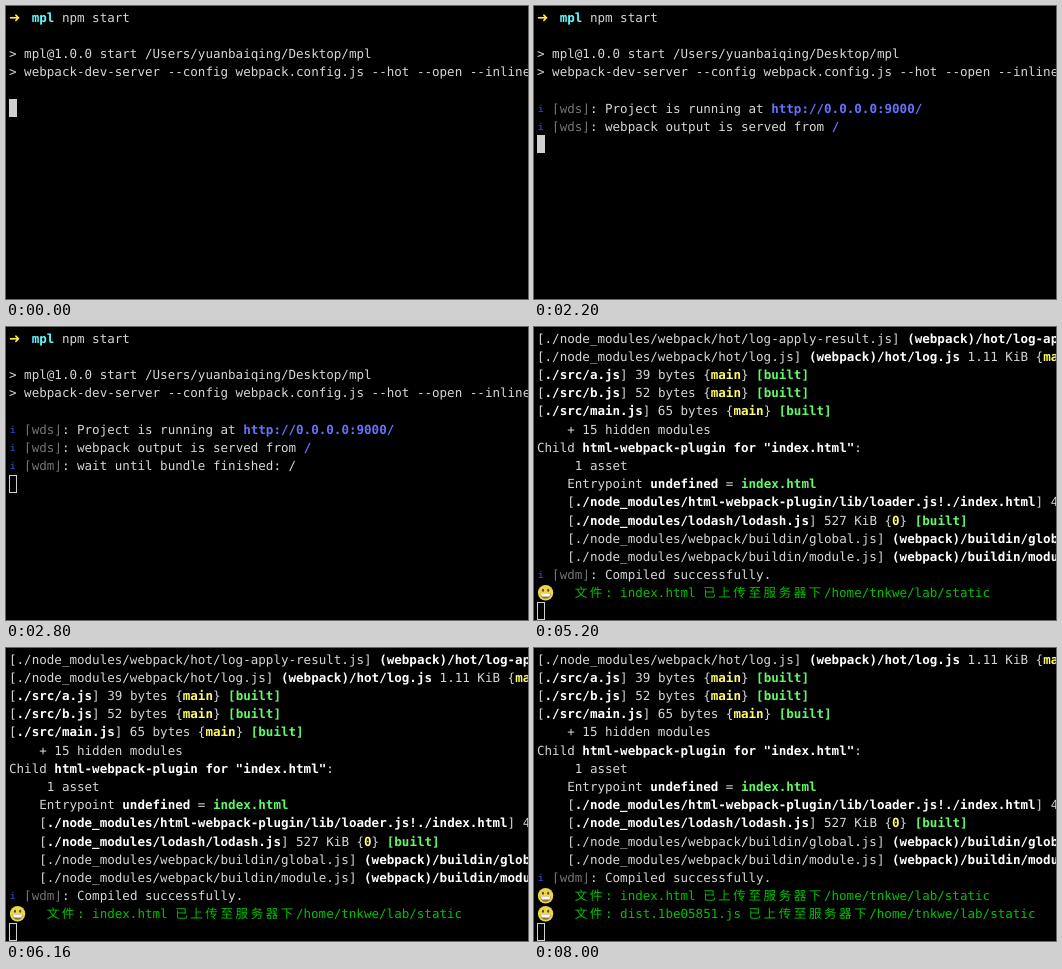
An HTML page for the animation above (8800 ms loop, 522x293 px).

```html
<!DOCTYPE html>
<html lang="zh-CN">
<head>
<meta charset="utf-8">
<title>Terminal</title>
<style>
html, body { margin: 0; width: 100%; height: 100%; overflow: hidden; background: #000; }
#term {
  position: absolute; inset: 0; overflow: hidden; contain: strict; color: #d6d6d6;
  font: 12.56px "DejaVu Sans Mono", "Noto Sans CJK SC", "Noto Sans CJK", monospace;
  text-rendering: geometricPrecision; font-variant-ligatures: none;
}
#rows { position: absolute; left: 3px; top: 2.7px; }
.row { height: 18.2px; line-height: 18.2px; white-space: pre; }
b { color: #fff; }
.cyan { color: #60fdff; }
.yellow { color: #fffc67; }
.green { color: #5ffa68; }
.blue { color: #6871ff; }
.grey { color: #747474; }
.ok { color: #00c200; }
.cell { display: inline-block; width: 7.56px; height: 18.2px; vertical-align: top; }
.arrow { color: #ffe84d; font: bold 13.5px/18.2px "DejaVu Sans", sans-serif; }
.info { color: #2a3c9c; font-size: 9px; font-weight: bold; line-height: 20px; text-indent: 1px; }
.wide { letter-spacing: calc(2ch - 1em); }
.face { display: inline-block; width: 2ch; height: 18.2px; vertical-align: top; overflow: visible; }
#cursor { position: absolute; left: 3px; width: 8px; height: 18px; box-sizing: border-box; border: 1px solid #d0d0d0; }
</style>
</head>
<body>
<div id="term"><div id="rows"></div><div id="cursor"></div></div>
<script>
const LOOP = 8800, ROW = 18.2, VISIBLE = 15;

const bold = (text, color = '') => `<b class="${color}">${text}</b>`;
const info = (tag, text) =>
  `<span class="cell info">i</span> <span class="grey">⌈${tag}⌋</span>: ${text}`;
const built = (path, size, chunk = 'main') =>
  `[${bold(path)}] ${size} {${bold(chunk, 'yellow')}} ${bold('[built]', 'green')}`;
const internal = (path, size) =>
  `[./node_modules/webpack/${path}] ${bold('(webpack)/' + path)} ${size} {${bold('main', 'yellow')}}`;
const face = `<svg class="face" viewBox="0 0 15.12 18.2">
<circle cx="8.6" cy="8.8" r="7.7" fill="#ecd54a"/>
<ellipse cx="6" cy="6.2" rx="1" ry="1.5" fill="#5b4a20"/>
<ellipse cx="11.2" cy="6.2" rx="1" ry="1.5" fill="#5b4a20"/>
<path d="M3.4 9.4H13.8Q13.2 14.8 8.6 14.8T3.4 9.4Z" fill="#8a7040"/>
<path d="M3.8 9.6H13.4L12.4 12.6H4.8Z" fill="#fff"/></svg>`;
const upload = file =>
  `${face}   <span class="ok"><span class="wide">文件</span>: ${file} ` +
  `<span class="wide">已上传至服务器下</span>/home/tnkwe/lab/static</span>`;

const lines = [
  `<span class="cell arrow">➜</span>  ${bold('mpl', 'cyan')} npm start`,
  '',
  '&gt; mpl@1.0.0 start /Users/yuanbaiqing/Desktop/mpl',
  '&gt; webpack-dev-server --config webpack.config.js --hot --open --inline',
  '',
  info('wds', 'Project is running at ' + bold('http://0.0.0.0:9000/', 'blue')),
  info('wds', 'webpack output is served from ' + bold('/', 'blue')),
  info('wdm', 'wait until bundle finished: /'),
  internal('hot/emitter.js', '75 bytes'),
  internal('hot/log-apply-result.js', '1.27 KiB'),
  internal('hot/log.js', '1.11 KiB'),
  built('./src/a.js', '39 bytes'),
  built('./src/b.js', '52 bytes'),
  built('./src/main.js', '65 bytes'),
  '    + 15 hidden modules',
  `Child ${bold('html-webpack-plugin for "index.html"')}:`,
  '     1 asset',
  `    Entrypoint ${bold('undefined')} = ${bold('index.html', 'green')}`,
  '    ' + built('./node_modules/html-webpack-plugin/lib/loader.js!./index.html', '419 bytes', '0'),
  '    ' + built('./node_modules/lodash/lodash.js', '527 KiB', '0'),
  '    ' + internal('buildin/global.js', '472 bytes'),
  '    ' + internal('buildin/module.js', '497 bytes'),
  info('wdm', 'Compiled successfully.'),
  upload('index.html'),
  upload('dist.1be05851.js'),
];

// [start ms, lines printed so far, cursor filled]
const steps = [
  [0, 5, true], [2200, 7, true], [2800, 8, false],
  [3600, 23, false], [5200, 24, false], [6800, 25, false],
];

const rows = document.getElementById('rows');
const cursor = document.getElementById('cursor');
let shown;

function show([, count, filled]) {
  const visible = lines.slice(Math.max(0, count - VISIBLE), count);
  rows.innerHTML = visible.map(line => `<div class="row">${line}</div>`).join('');
  cursor.style.top = Math.round(2 + visible.length * ROW) + 'px';
  cursor.style.background = filled ? '#d0d0d0' : 'none';
}

const start = performance.now();
function frame() {
  const t = (performance.now() - start) % LOOP;
  const step = steps.findLast(s => s[0] <= t);
  if (step !== shown) show(shown = step);
  requestAnimationFrame(frame);
}
frame();
</script>
</body>
</html>
```
